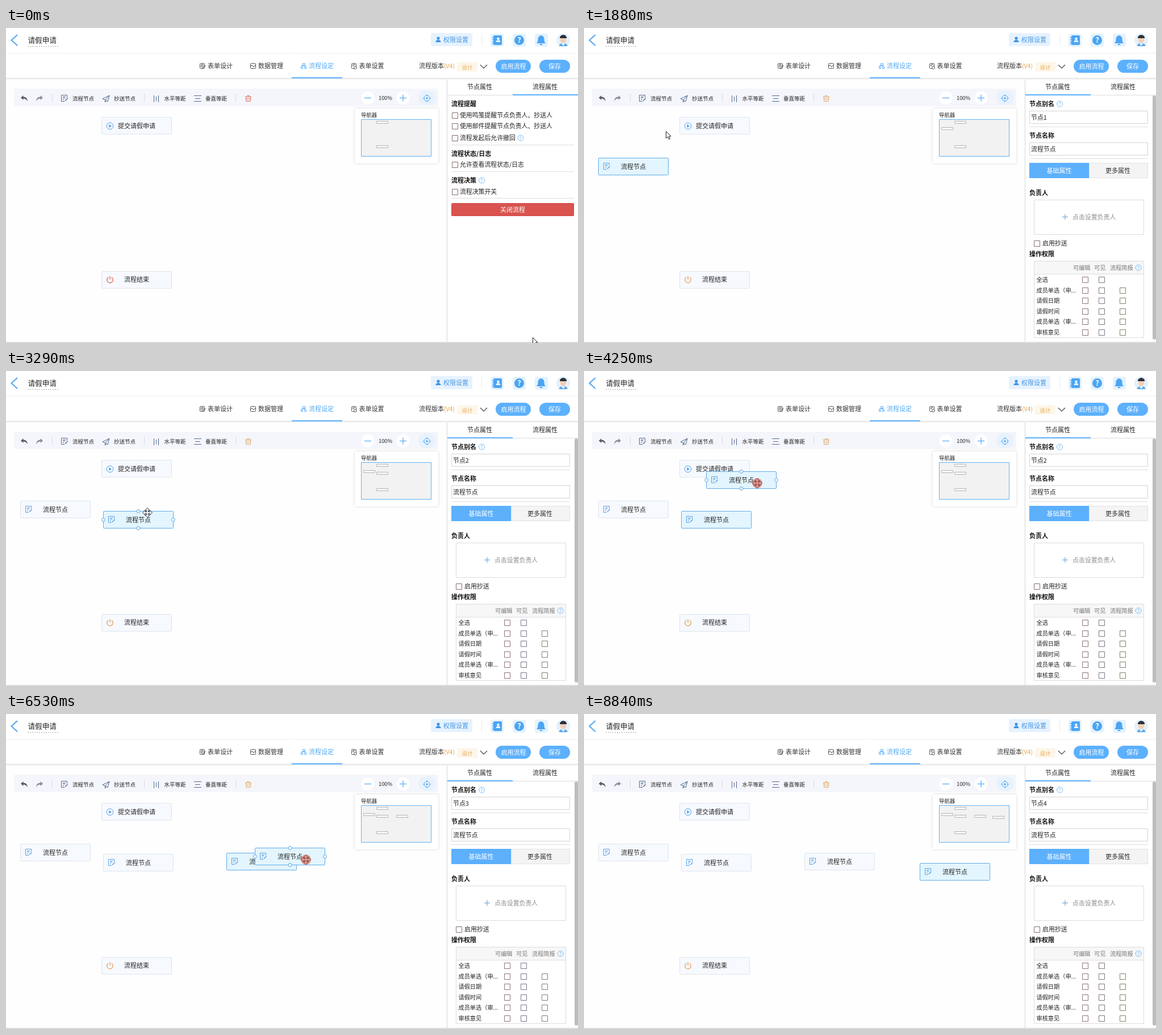
Animation, 1007 px wide and 556 px high, one loop 9630 ms. Source, as an HTML page with a canvas:

```html
<!DOCTYPE html>
<html lang="zh-CN">
<head>
<meta charset="utf-8">
<title>请假申请</title>
<style>
html, body { margin: 0; width: 100%; height: 100%; overflow: hidden; background: #fff; }
canvas { display: block; width: 1007px; height: 556px; }
</style>
</head>
<body>
<canvas id="stage" width="1007" height="556"></canvas>
<script>
const ctx = document.getElementById('stage').getContext('2d');
const FONT = '"Noto Sans CJK SC", "Noto Sans CJK", "Noto Sans", sans-serif';
const BLUE = '#5cb0fc', INK = '#222', LINE = '#dedede';
const LOOP = 9630, STEP = 78.74;
const NODE_W = 123, NODE_H = 30, GRAB_X = 90, GRAB_Y = 21;

// cursor path: time, x, y
const path = [
  [0, 927, 546], [860, 109, 125], [945, 109, 125], [1560, 115, 250], [1650, 115, 250],
  [1890, 144, 182], [2200, 118, 125], [2290, 118, 125], [2990, 261, 268], [3080, 261, 268],
  [3307, 249, 250], [3680, 118, 125], [3780, 118, 125], [4700, 478, 266], [4800, 478, 266],
  [5118, 367, 248], [5640, 118, 125], [5760, 118, 125], [6535, 528, 257], [6850, 681, 284],
  [7330, 681, 284], [7810, 770, 345], [8450, 770, 345], [8818, 1010, 530], [LOOP, 1010, 530]
];
// press time, drop time, dropped position
const drags = [
  [900, 1650, 25, 229], [2260, 3080, 171, 247], [3750, 4800, 388, 245], [5740, 7330, 591, 263]
];

function slope(i, k) {
  const a = path[i - 1], b = path[i], c = path[i + 1];
  if (!a || !c) return 0;
  const still = (p, q) => p[1] === q[1] && p[2] === q[2];
  return still(a, b) || still(b, c) ? 0 : (c[k] - a[k]) / (c[0] - a[0]);
}
function cursorAt(t) {
  let i = 0;
  while (i < path.length - 2 && t >= path[i + 1][0]) i++;
  const a = path[i], b = path[i + 1], d = b[0] - a[0], u = (t - a[0]) / d;
  const u2 = u * u, u3 = u2 * u;
  return [1, 2].map(k => (2 * u3 - 3 * u2 + 1) * a[k] + (u3 - 2 * u2 + u) * d * slope(i, k) +
    (3 * u2 - 2 * u3) * b[k] + (u3 - u2) * d * slope(i + 1, k));
}

function text(s, x, y, size = 11, color = INK, align = 'left', weight = 400) {
  ctx.font = `${weight} ${size}px ${FONT}`;
  ctx.fillStyle = color;
  ctx.textAlign = align;
  ctx.fillText(s, x, y + size * 0.37);
}
const bold = (s, x, y) => text(s, x, y, 11, '#111', 'left', 700);

function paint(fill, stroke, w = 1) {
  if (fill) { ctx.fillStyle = fill; ctx.fill(); }
  if (stroke) { ctx.strokeStyle = stroke; ctx.lineWidth = w; ctx.stroke(); }
}
function box(x, y, w, h, fill, stroke, r = 0) {
  ctx.beginPath();
  const o = stroke ? 0.5 : 0;
  ctx.roundRect(x + o, y + o, w, h, r);
  paint(fill, stroke);
}
function disc(x, y, r, fill, stroke, w) {
  ctx.beginPath();
  ctx.arc(x, y, r, 0, 7);
  paint(fill, stroke, w);
}
function line(color, w, ...p) {
  ctx.beginPath();
  for (let i = 0; i < p.length; i += 2) ctx.lineTo(p[i], p[i + 1]);
  paint(null, color, w);
}
function poly(fill, ...p) {
  ctx.beginPath();
  for (let i = 0; i < p.length; i += 2) ctx.lineTo(p[i], p[i + 1]);
  ctx.closePath();
  paint(fill);
}
const rule = (x1, x2, y, color = LINE) => line(color, 1, x1, y + 0.5, x2, y + 0.5);

function help(x, y) {
  disc(x, y, 5, null, '#79bdf7');
  text('?', x, y, 8, BLUE, 'center');
}
function check(x, y, color = '#85706c') {
  box(x - 5, y - 5, 10, 10, '#fff', color);
}
function option(s, y) {
  check(790, y);
  text(s, 799, y, 10.87);
}

function docIcon(x, y, color) {
  line(color, 1, x + 4.5, y - 1, x + 4.5, y - 5.5, x - 5.5, y - 5.5, x - 5.5, y + 5.5, x, y + 5.5);
  rule(x - 3, x + 2, y - 3, color);
  rule(x - 3, x + 1, y - 1, color);
  rule(x - 3, x - 1, y + 2, color);
  line(color, 1.5, x + 1, y + 4.5, x + 5.5, y);
}
function personIcon(x, y, color, k) {
  disc(x, y - 2.4 * k, 2.6 * k, color);
  ctx.beginPath();
  ctx.ellipse(x, y + 4.5 * k, 4.6 * k, 4 * k, 0, Math.PI, 0);
  paint(color);
}
function turnArrow(x, dir, color) {
  ctx.save();
  ctx.translate(x, 124.5);
  ctx.scale(dir, 1);
  ctx.beginPath();
  ctx.moveTo(-6, -1.5);
  ctx.lineTo(-1.5, -5.5);
  ctx.lineTo(-1.5, -3);
  ctx.quadraticCurveTo(5.5, -3, 6, 5);
  ctx.quadraticCurveTo(3.5, 0, -1.5, 0);
  ctx.lineTo(-1.5, 2.5);
  paint(color);
  ctx.restore();
}

function avatar(x, y) {
  disc(x, y, 12, '#e4f1fd');
  ctx.beginPath();
  ctx.ellipse(x, y + 10.5, 7.5, 5.5, 0, Math.PI, 0);
  paint('#5fa9e6');
  poly('#fff', x - 3, y + 5.5, x + 3, y + 5.5, x, y + 10);
  disc(x, y - 0.5, 5.3, '#f6cfb0');
  ctx.beginPath();
  ctx.ellipse(x, y - 3.5, 6.2, 6, 0, Math.PI, 0);
  paint('#2b303a');
}

function header() {
  box(0, 0, 1007, 91, '#fff');
  rule(0, 1007, 44, '#efefef');
  box(0, 88, 1007, 1, '#e3e3e3');
  box(0, 89, 1007, 2, '#f1f1f1');
  line('#4fa6f2', 2, 20, 12, 9.5, 21.5, 20, 31);
  text('请假申请', 38.5, 21, 12.6);
  ctx.setLineDash([2, 2]);
  rule(38, 92, 32, '#aaa');
  ctx.setLineDash([]);

  box(748, 9, 73, 23, '#e6f2fe', null, 3);
  personIcon(761, 20.5, '#3f92e0', 1);
  text('权限设置', 770, 21, 11, '#4597e4');
  line('#ececec', 1, 837.5, 10, 837.5, 32);
  for (const x of [853, 892, 931]) box(x, 10, 23, 23, '#e4f2fe', null, 4);
  box(858, 13, 15, 17, '#4ba5f3', null, 2);
  for (const y of [16, 20, 24, 27]) box(856, y, 4, 1.5, '#4ba5f3');
  personIcon(866.5, 21, '#fff', 0.85);
  disc(903.5, 21.5, 8.5, '#4ba5f3');
  text('?', 903.5, 21.5, 13, '#fff', 'center', 700);
  ctx.beginPath();
  ctx.moveTo(934, 27);
  ctx.quadraticCurveTo(936.5, 25, 936.5, 20);
  ctx.bezierCurveTo(936.5, 11, 947.5, 11, 947.5, 20);
  ctx.quadraticCurveTo(947.5, 25, 950, 27);
  paint('#4ba5f3');
  box(939.5, 28, 5, 2, '#4ba5f3', null, 1);
  avatar(981, 21.5);
}

function tabs() {
  const names = ['表单设计', '数据管理', '流程设定', '表单设置'], xs = [355, 444, 533, 621.5];
  names.forEach((s, i) => text(s, xs[i], 67, 11, i === 2 ? '#4fa8f5' : '#333'));
  const g = '#555';
  box(341, 62, 8, 9, null, g, 1);
  rule(343, 348, 64, g); rule(343, 348, 66, g); rule(343, 346, 68, g);
  line(g, 1.3, 346, 71, 351, 66);
  box(430, 62, 9, 9, null, g, 1);
  line(g, 1, 431, 68, 433, 65, 436, 69, 439, 65);
  box(522, 62, 4, 3, null, BLUE);
  box(519, 68, 3, 3, null, BLUE);
  box(525, 68, 3, 3, null, BLUE);
  line(BLUE, 1, 520.5, 68, 520.5, 66.5, 527, 66.5, 527, 68);
  box(608, 62, 8, 9, null, g, 1);
  rule(610, 615, 64, g); rule(610, 613, 66, g);
  disc(615, 70, 2.4, '#fff', g);
  box(503, 87, 89, 2, BLUE);

  text('流程版本', 727, 67, 11, '#333');
  text('(V4)', 771, 67, 10.5, '#e3a54e');
  box(794, 60, 36, 17, '#fdf6ea', null, 2);
  text('设计', 802.5, 69, 9.5, '#e5a84f');
  line('#444', 1.2, 835, 65, 841, 71, 847, 65);
  box(862, 56, 62, 23, BLUE, null, 11.5);
  text('启用流程', 893.5, 67.5, 11, '#fff', 'center');
  box(939, 56, 54, 23, BLUE, null, 11.5);
  text('保存', 966, 67.5, 11, '#fff', 'center');
}

function toolbar(hover, warm) {
  box(14, 107, 747, 31, '#f4f6fb', null, 2);
  turnArrow(32, 1, '#565a66');
  turnArrow(59, -1, '#8b8d9c');
  for (const x of [81, 243, 404]) line('#d9dce3', 1, x + 0.5, 116, x + 0.5, 131);
  if (hover) box(90, 111, 72, 25, '#e3f3fd');
  const ic = '#53698c';
  docIcon(103, 124, hover ? BLUE : ic);
  text('流程节点', 117, 124.5, 9.5, hover ? '#4fa8f5' : INK);
  ctx.beginPath();
  [[170, 125], [182, 119], [179, 130], [175, 127]].forEach(p => ctx.lineTo(...p));
  ctx.closePath();
  paint(null, ic);
  line(ic, 1, 182, 119, 175, 127, 174, 131, 177, 128.5);
  text('抄送节点', 190, 124.5, 9.5);
  line(ic, 1, 260.5, 119, 260.5, 131);
  line(ic, 1, 264.5, 121, 264.5, 129);
  line(ic, 1, 268.5, 119, 268.5, 131);
  text('水平等距', 278.5, 124.5, 9.5);
  rule(331, 344, 119, ic); rule(333, 342, 124, ic); rule(331, 344, 129, ic);
  text('垂直等距', 351, 124.5, 9.5);
  rule(421, 432, 121, warm);
  rule(424, 429, 119, warm);
  box(422, 121, 8, 8, null, warm, 1);
  line(warm, 1, 425, 123.5, 425, 127.5);
  line(warm, 1, 428, 123.5, 428, 127.5);

  disc(637, 123.5, 11.5, '#fff');
  disc(699, 123.5, 11.5, '#fff');
  line('#4fa8f5', 1.2, 631, 123.5, 643, 123.5);
  line('#4fa8f5', 1.2, 693, 123.5, 705, 123.5);
  line('#4fa8f5', 1.2, 699, 117.5, 699, 129.5);
  text('100%', 668, 123.5, 9.3, INK, 'center');
  box(726, 110, 31, 26, '#e8f2fd', null, 12);
  disc(741, 124, 5, null, '#4fa8f5');
  disc(741, 124, 1.8, '#4fa8f5');
  for (const [a, b] of [[1, 0], [-1, 0], [0, 1], [0, -1]])
    line('#4fa8f5', 1, 741 + a * 4, 124 + b * 4, 741 + a * 7, 124 + b * 7);
}

function dots(x, y) {
  const mx = x + NODE_W / 2 + 0.5, my = y + NODE_H / 2 + 0.5;
  for (const [a, b] of [[mx, y + 0.5], [mx, y + NODE_H + 0.5], [x + 0.5, my], [x + NODE_W + 0.5, my]])
    disc(a, b, 2.9, '#fff', '#4fa3ea');
}
function frameNode(x, y, on) {
  box(x, y, NODE_W, NODE_H, on ? '#e3f5fe' : '#f6f9fe', on ? '#5fabe8' : '#dfe5ed', 1);
}
function stepNode(x, y, on) {
  frameNode(x, y, on);
  docIcon(x + 15, y + 15, '#5a9fe0');
  text('流程节点', x + 62, y + 15.5, 11, INK, 'center');
}
function startNode() {
  frameNode(168, 157);
  disc(183, 173, 5.8, null, '#4fa3ea');
  poly('#4fa3ea', 181.3, 170, 181.3, 176, 186, 173);
  text('提交请假申请', 197, 173);
}
function endNode(warm) {
  frameNode(168, 429);
  ctx.beginPath();
  ctx.arc(183, 444.5, 5.3, -1.05, Math.PI + 1.05);
  paint(null, warm, 1.2);
  line(warm, 1.2, 183, 438, 183, 444);
  text('流程结束', 230, 444, 11, INK, 'center');
}

function overview(nodes) {
  ctx.save();
  ctx.shadowColor = 'rgba(0,0,0,.16)';
  ctx.shadowBlur = 4;
  box(614, 142, 147, 97, '#fff', null, 2);
  ctx.restore();
  text('导航器', 625, 154, 9.4);
  box(625, 161, 123, 65, '#f2f2f2', '#62b1f2');
  for (const [x, y] of nodes)
    box(Math.round(625 + x * 0.159), Math.round(138.9 + y * 0.158), 20, 4, '#f8f8f8', '#b5b5b5');
}

function flowPanel() {
  bold('流程提醒', 784, 134);
  option('使用鸣笺提醒节点负责人、抄送人', 154);
  option('使用邮件提醒节点负责人、抄送人', 173);
  option('流程发起后允许撤回', 194);
  help(906, 194);
  rule(784, 1000, 206);
  bold('流程状态/日志', 784, 222);
  option('允许查看流程状态/日志', 241);
  rule(784, 1000, 253);
  bold('流程决策', 784, 269);
  help(837.5, 269);
  option('流程决策开关', 289);
  rule(784, 1000, 300);
  box(784, 309, 215, 22, '#d9534f', '#d64c47', 1);
  text('关闭流程', 892, 321, 11, '#fff', 'center');
}

function nodePanel(n) {
  bold('节点别名', 784, 134);
  help(837.5, 134);
  box(784, 146, 208, 22, '#fff', '#d4d4d4');
  text('节点' + n, 787, 158, 10.9);
  rule(784, 993, 174);
  bold('节点名称', 784, 190);
  box(784, 202, 208, 22, '#fff', '#d4d4d4');
  text('流程节点', 787, 213.5, 10.9);
  rule(784, 993, 230);
  box(889, 238, 103, 26, '#f4f4f4', '#e2e2e2');
  box(784, 238, 105, 27, BLUE);
  text('基础属性', 836.5, 252, 11, '#fff', 'center');
  text('更多属性', 940, 252, 11, '#333', 'center');
  bold('负责人', 784, 291);
  box(792, 303, 193, 61, '#fff', '#dcdcdc');
  line('#6fa9da', 1.2, 842, 333.5, 852, 333.5);
  line('#6fa9da', 1.2, 847, 328.5, 847, 338.5);
  text('点击设置负责人', 860, 334, 10.9, '#8c8c94');
  check(797, 380);
  text('启用抄送', 807, 380, 10.9);
  bold('操作权限', 784, 399);

  box(792, 411, 193, 135, '#fff', '#dcdcdc');
  box(793, 412, 192, 22, '#f7f7f7');
  rule(793, 985, 434);
  text('可编辑', 861, 423, 10.2, '#777');
  text('可见', 898, 423, 10.2, '#777');
  text('流程简报', 926, 423, 10.2, '#777');
  help(976, 423);
  ['全选', '成员单选（申...', '请假日期', '请假时间', '成员单选（审...', '审核意见'].forEach((s, i) => {
    const y = Math.round(444 + i * 18.6);
    text(s, 796.5, y, 10.2);
    check(882, y, '#8f7177');
    check(911, y, '#7d7688');
    if (i) check(948, y, '#78866c');
  });
  box(1001, 119, 6, 431, '#bdbdbd', null, 3);
}

function sidePanel(n) {
  box(776, 91, 231, 463, '#fff');
  line('#d6d6d6', 1, 776.5, 91, 776.5, 554);
  text('节点属性', 834, 104, 11, INK, 'center');
  text('流程属性', 949, 104, 11, INK, 'center');
  rule(777, 1007, 118);
  box(n ? 777 : 892, 117, 115, 2, BLUE);
  if (n) nodePanel(n); else flowPanel();
}

function arrow(x, y) {
  ctx.beginPath();
  [[0, 0], [0, 12], [3, 9.4], [5, 14], [7, 13.1], [5, 8.6], [8.6, 8.6]]
    .forEach(([a, b]) => ctx.lineTo(x + a + 0.5, y + b + 0.5));
  ctx.closePath();
  paint('#fff', '#222');
}
function moveCursor(x, y) {
  ctx.save();
  ctx.translate(x, y);
  ctx.beginPath();
  for (let i = 0; i < 4; i++) {
    const c = [1, 0, -1, 0][i], s = [0, 1, 0, -1][i];
    for (const [a, b] of [[1.4, -1.4], [4, -1.4], [4, -4.2], [8.5, 0], [4, 4.2], [4, 1.4]])
      ctx.lineTo(a * c - b * s, a * s + b * c);
  }
  ctx.closePath();
  paint('#fff', '#2c2c38');
  ctx.restore();
}

function draw(t) {
  const [cx, cy] = cursorAt(t).map(Math.round);
  const placed = drags.filter(d => t >= d[1]).map(d => [d[2], d[3]]);
  const held = drags.some(d => t >= d[0] && t < d[1]);
  const n = placed.length;
  const warm = n ? '#e59b56' : '#e0604f';
  const inside = (x, y, w, h) => cx >= x && cx <= x + w && cy >= y && cy <= y + h;
  const overTool = inside(90, 111, 72, 25);
  const all = [[168, 157], [168, 429], ...placed];
  const over = held ? null : all.find(p => inside(p[0], p[1], NODE_W, NODE_H));

  box(0, 0, 1007, 556, '#fefefe');
  header();
  tabs();
  toolbar(overTool, warm);
  startNode();
  endNode(warm);
  placed.forEach((p, i) => stepNode(p[0], p[1], i === n - 1));
  if (over) dots(...over);
  overview(all);
  if (held && cy > 150) {
    stepNode(cx - GRAB_X, cy - GRAB_Y, true);
    dots(cx - GRAB_X, cy - GRAB_Y);
  }
  sidePanel(n);
  box(0, 554, 1007, 2, '#dcdcdc');

  if (held || over || overTool) moveCursor(cx, cy);
  else if (cx < 1007) arrow(cx, cy);
  if (held) disc(cx, cy, 9, 'rgba(205,70,50,.5)');
}

const begin = performance.now();
function tick() {
  const t = (performance.now() - begin) % LOOP;
  draw(Math.min(LOOP - 1, Math.floor((t + 24) / STEP) * STEP));
  requestAnimationFrame(tick);
}
tick();
</script>
</body>
</html>
```
